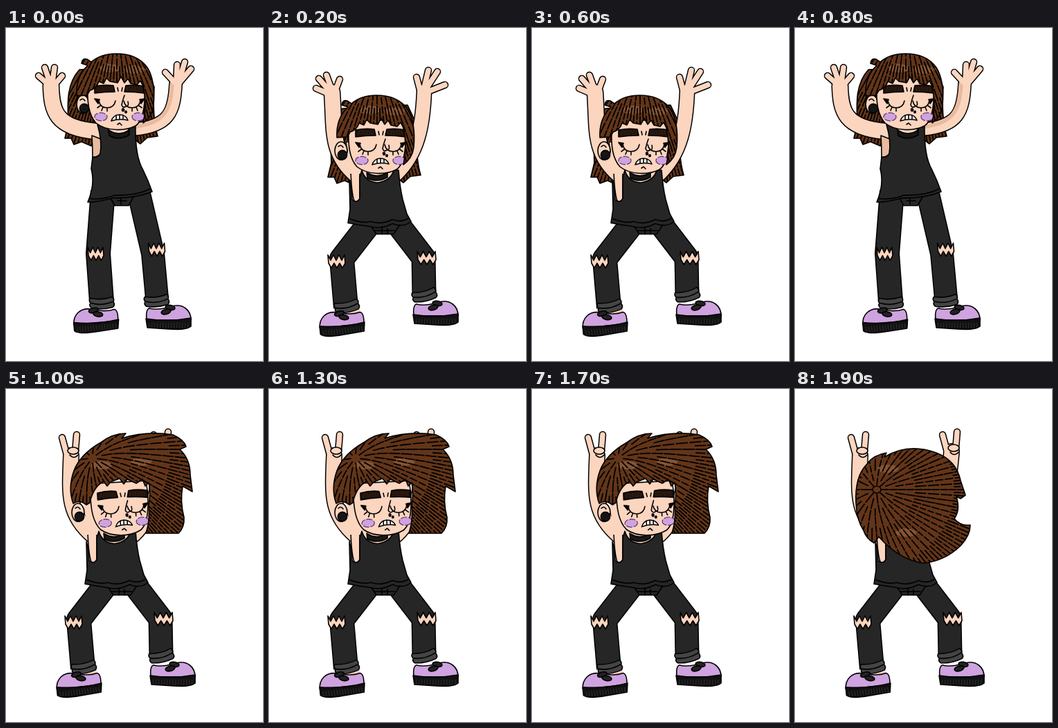
These frames come from a looping animation (371 by 480 pixels, 2100 ms). An HTML page:

```html
<!DOCTYPE html>
<html lang="en">
<head>
<meta charset="utf-8">
<title>Headbanger</title>
<style>
  html, body { margin: 0; width: 100%; height: 100%; overflow: hidden; background: #fff; }
  svg { display: block; width: 100%; height: 100%; stroke: #000; stroke-width: 1.6; stroke-linejoin: round; stroke-linecap: round; }
</style>
</head>
<body>
<svg id="stage" viewBox="0 0 371 480"></svg>
<script>
const SKIN = '#fcd5bf', SHADE = '#e9bb9f', CLOTH = '#262626', CUFF = '#444', PURPLE = '#cfa3df', HAIR = '#633519';

let seed = 7;
const rand = () => (seed = seed * 16807 % 2147483647) / 2147483647;

const path = (d, fill = 'none', extra = '') => `<path d="${d}" fill="${fill}" ${extra}/>`;
const flat = (d, fill) => path(d, fill, 'stroke="none"');
const line = (d, width, color = '#000', cap = 'round') =>
  path(d, 'none', `stroke="${color}" stroke-width="${width}" stroke-linecap="${cap}"`);
const oval = (x, y, rx, ry, fill, extra = '') => `<ellipse cx="${x}" cy="${y}" rx="${rx}" ry="${ry}" fill="${fill}" ${extra}/>`;
const group = (transform, content) => `<g transform="${transform}">${content}</g>`;
const repeat = (n, make) => Array.from({ length: n }, (_, i) => make(i)).join('');

// Limbs are thick lines along their bones, so joined parts share one outline.
function arm(bone, width, fingers, shaded) {
  return line(bone, width + 3) + line(fingers, 10.5) + line(bone, width, SKIN) +
    (shaded ? group('translate(-5 -3)', line(bone, width / 3, SHADE)) : '') + line(fingers, 7.5, SKIN);
}
const leg = (bone, width) => line(bone, width + 3, '#000', 'butt') + line(bone, width, CLOTH, 'butt');

const hornArm = (bone, x, y) =>
  arm(bone, 21, `M${x - 7} ${y}l-6 -22M${x + 6} ${y - 2}l2 -24`) +
  oval(x + 3, y - 3, 8, 5, SKIN) + path(`M${x - 2} ${y + 3}q6 7 12 0`);

const rip = (x, y, width) => {
  const step = width / 6;
  const zigzag = (dir, tall) => repeat(6, i => `l${dir * step} ${i % 2 ? -tall : tall}`);
  return path(`M${x - width / 2} ${y - 8}${zigzag(1, 8)}l1 12${zigzag(-1, 7)}Z`, SKIN);
};

const cuff = (x, y, tilt) => group(`translate(${x} ${y}) rotate(${tilt})`,
  path('M-16 -7Q0 -3 16 -8Q19 -4 17 -1Q20 4 16 7Q0 11 -15 7Q-19 3 -16 0Q-19 -4 -16 -7Z', CUFF) +
  path('M-15 0Q0 5 16 -1'));

function shoe(transform) {
  return group(transform,
    path('M1 20C0 10 1 4 5 3C16 6 27 3 38 0C54 -4 65 6 65 20Z', PURPLE) +
    path('M0 18Q33 23 65 17L65 29Q58 35 33 33L2 31Z', '#111') +
    line(repeat(15, i => `M${5 + i * 4} 24l-.5 7`), .6, '#444') +
    oval(35, 2, 7, 3.5, '#222', 'transform="rotate(10 35 2)"') + oval(29, 8, 7, 3.5, '#222', 'transform="rotate(-15 29 8)"'));
}

// Strands leave the crown at even angles and bend towards the flow; finer ones start further out.
function strands(x, y, flow, pull) {
  const rays = 128, reach = 5.5 * rays / (2 * Math.PI);
  return repeat(rays, i => {
    const angle = i / rays * 2 * Math.PI;
    const level = [16, 8, 4, 2, 1].find(n => i % n === 0);
    const points = [];
    for (let r = reach / level; r < 200; r += 12) {
      const turned = angle + pull * Math.sin(flow - angle) * (1 - Math.exp(-r / 60));
      points.push(`${(x + r * Math.cos(turned)).toFixed(1)} ${(y + r * Math.sin(turned)).toFixed(1)}`);
    }
    const dash = `${(8 + rand() * 10).toFixed(1)} ${(2 + rand() * 2).toFixed(1)}`;
    return path('M' + points.join('L'), 'none', `stroke-dasharray="${dash}"`);
  });
}

function hair(id, outline, crown, shines = []) {
  const shine = shines.map(([x, y]) => oval(x, y, 15, 6, '#b98360', 'opacity=".4" stroke="none"')).join('');
  return `<clipPath id="${id}"><path d="${outline}"/></clipPath>` + flat(outline, HAIR) +
    `<g clip-path="url(#${id})" stroke-width="1.8">${shine}${strands(...crown)}</g>` + path(outline);
}

const brow = path('M-14 -4Q0 -7 13 -5L15 4Q0 4 -14 6Z', '#21130c') +
  line(repeat(6, i => `M${i * 4 - 10} 3l2 -6`), .6, '#4b2a18');
const eye = path('M-12 -1Q-10 9 0 9Q10 9 12 -1M-10 6l-4 3M-6 8l-2 5M0 9v5') + path('M-18 -4L-11 -3L-13 3Z', '#000');
const cheek = oval(0, 0, 9, 5.8, PURPLE, 'stroke="#59336b" stroke-width="1.2" stroke-dasharray="8 3"');
const mouth = path('M-12 4Q-9 -5 0 -5Q9 -5 12 3Q0 0 -12 4Z', '#fff') + path('M-5 -4v6M0 -5v6M5 -4v5M-3 9l3 -2l3 3');
const nose = path('M-1 -11Q-4 -3 -5 3Q-3 8 1 5Q6 5 4 -2') + oval(-3, 10, 1.4, 1.9, '#000') + oval(1, 13, 1.2, 1.5, '#000');

function face(x, y, tilt) {
  const pair = (gap, height, art) => [-1, 1].map(side =>
    group(`translate(${side * gap} ${height}) scale(${-side} 1)`, art)).join('');
  return group(`translate(${x} ${y}) rotate(${tilt})`,
    path('M-46 -24C-47 0 -45 19 -34 31C-19 43 8 43 23 35C35 27 39 -2 35 -36H-39Z', SKIN) +
    pair(22, -18, brow) + pair(18, 0, eye) + pair(27, 22, cheek) + path('M-3 -20l1 5M4 -20l-1 5') +
    group('translate(8 2)', nose) + group('translate(0 24)', mouth));
}

const ear = (x, y) => oval(x, y, 9, 13, SKIN) + path(`M${x - 4} ${y - 6}q4 -4 7 1`) + oval(x + 2, y + 6, 6.6, 6.6, '#151515');

const choker = (x, y) => path(`M${x - 15} ${y - 4}q15 10 30 0v7q-15 9 -29 1Z`, '#181818');

const standing =
  leg('M140 235L133 325L138 394', 33) + leg('M191 235L212 325L218 390', 31) +
  path('M148 240H186L177 256H157Z', CLOTH) + path('M161 249h13M166 246v8') +
  rip(129, 324, 22) + rip(217, 318, 23) +
  cuff(138, 396, -2) + cuff(217, 393, -5) +
  shoe('translate(161 402) scale(-1 1) rotate(5)') + shoe('translate(202 401)') +
  flat('M133 138H188L182 160H140Z', SKIN) +
  path('M132 139Q139 163 136 181Q132 187 125 186L123 203Q129 225 118 251Q135 251 154 245Q185 246 211 236Q205 219 198 205Q186 185 187 139L180 139Q174 158 162 158Q150 157 146 140Z', CLOTH) +
  choker(163, 151) + path('M121 246Q140 248 157 241Q188 242 208 232');

const squat =
  leg('M150 275L105 333L111 403', 33) + leg('M180 275L223 331L224 386', 32) +
  path('M145 282H190L180 297H155Z', CLOTH) + path('M152 292H181M163 288v9M171 289v8') +
  rip(97, 335, 24) + rip(227, 330, 26) +
  flat('M112 403H131V414H112Z', SKIN) + cuff(112, 401, -10) + cuff(224, 385, -12) +
  shoe('translate(136 406) scale(-1 1) rotate(6)') + shoe('translate(208 395)') +
  flat('M112 165H188V205L182 222H120Z', SKIN) +
  path('M118 206L131 206V246Q128 252 123 249Q119 238 118 206Z', SKIN) + flat('M117 200H132V210H117Z', SKIN) +
  path('M116 220Q120 230 120 247Q126 254 131 246V215L134 205Q139 222 157 223Q176 220 180 205H187Q189 230 193 247L199 268L205 279Q194 288 178 282Q161 291 145 286Q130 284 114 281L117 261Z', CLOTH) +
  choker(156, 212) + path('M117 275Q133 282 147 279Q163 284 178 276Q190 281 202 274');

const DOWN = Math.PI / 2;
const longHair = id => hair(id,
  'M106 60C86 82 89 112 90 138L85 159H94L98 168L109 164L123 170L140 160H185L194 167L204 158L219 156Q211 130 214 85L200 55Z',
  [160, 0, DOWN, .5]);
const fringe = id => hair(id,
  'M102 98C101 78 107 64 118 54L109 51Q110 43 117 45L123 49Q137 37 159 37Q190 37 204 57Q216 76 213 112Q211 128 198 137Q204 112 198 84L194 76L189 82L180 80L176 73L171 79L166 70L161 79L150 77L145 72L141 80L134 77Q131 87 121 90L117 97Z',
  [160, 0, DOWN, .5], [[150, 58], [185, 60]]);
const horns =
  hornArm('M226 90C222 140 215 180 184 210', 226, 88) +
  hornArm('M94 96C92 150 88 180 126 212', 94, 92);

const poses = {
  open:
    longHair('openBack') +
    arm('M65 84C66 120 72 144 130 149', 22, 'M62 82L47 69M63 78L56 57M67 78L70 57M70 82L81 69') +
    arm('M245 81C243 120 236 142 185 146', 17, 'M243 78L230 64M246 76L247 53M250 76L258 49M250 79L267 59', true) +
    path('M124 155L137 160V181Q132 187 125 186Q125 170 124 155Z', SHADE) +
    standing + ear(111, 110) + face(164, 106, 0) + fringe('openFringe'),

  raised:
    group('translate(0 56)', longHair('raisedBack')) +
    arm('M91 93C95 145 88 180 126 212', 22, 'M82 93L68 87M85 88L72 73M90 87L83 68M96 90L102 74') +
    arm('M224 92C222 140 215 180 184 210', 20, 'M218 90L213 71M224 86L230 61M228 86L243 63M231 91L254 82') +
    squat + ear(104, 177) + face(161, 169, 0) + group('translate(-4 60)', fringe('raisedFringe')),

  side:
    horns + squat + ear(104, 178) + face(169, 170, -3) +
    hair('sideHair',
      'M97 165Q89 143 98 118Q107 94 137 77Q154 64 173 64L167 71Q203 60 241 66Q257 73 260 83L251 87Q266 101 266 124L269 148L255 140Q251 162 257 185Q258 199 249 208H202Q208 190 206 167Q209 150 206 135L201 140L197 130L188 136L175 130L170 137L164 129L151 134L146 140L141 133Q126 141 121 164L116 167Q106 159 97 165Z',
      [125, 100, .9, .45], [[138, 110], [195, 105]]),

  back:
    horns + squat +
    hair('backHair',
      'M88 164Q86 126 104 108Q113 95 132 92L129 98Q164 77 204 92Q233 103 239 132L246 153L239 158L233 155Q239 174 230 187Q239 198 253 196Q253 211 239 226Q215 249 184 251Q149 245 121 213L114 222Q103 216 99 204Q89 189 88 164Z',
      [118, 145, 0, .3], [[134, 115], [160, 207]]) +
    oval(118, 145, 6, 5, HAIR),
};

const beat = (names, ms) => names.map(name => [name, ms]);
const steps = [
  ...beat(['open', 'raised', 'open', 'raised', 'open'], 200),
  ['side', 100],
  ...beat(['back', 'side', 'back', 'side', 'back'], 200),
];
const loop = steps.reduce((sum, [, ms]) => sum + ms, 0);

const stage = document.getElementById('stage');
stage.innerHTML = Object.entries(poses).map(([name, art]) => `<g id="${name}" display="none">${art}</g>`).join('');

function poseAt(time) {
  let t = time % loop;
  return steps.find(([, ms]) => (t -= ms) < 0)[0];
}

let start;
function draw(now) {
  start ??= now;
  const current = poseAt(now - start);
  for (const name in poses) document.getElementById(name).setAttribute('display', name === current ? 'inline' : 'none');
  requestAnimationFrame(draw);
}
requestAnimationFrame(draw);
</script>
</body>
</html>
```
